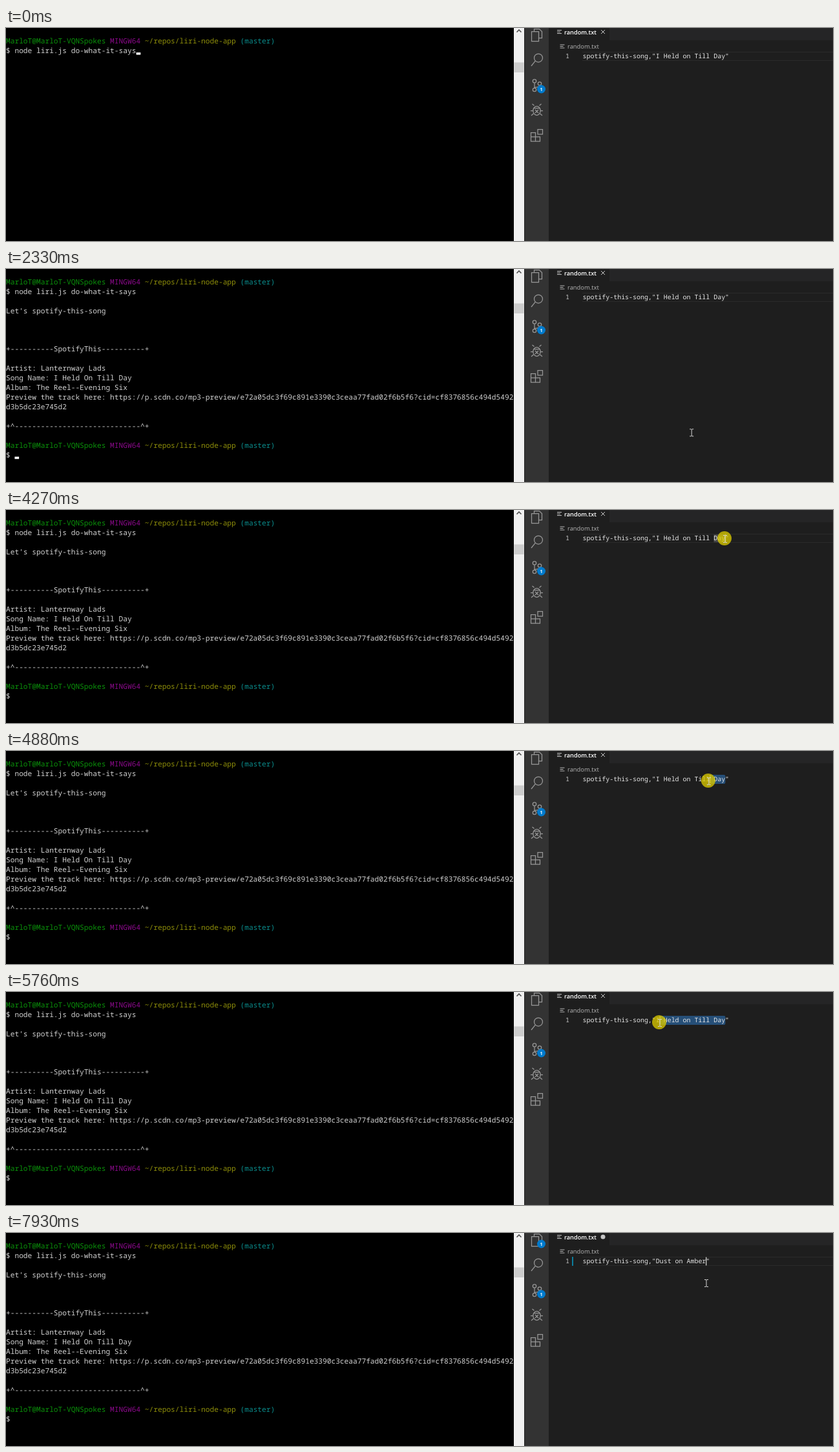
An HTML page that plays this animation: 1280x331 px, repeating every 8000 ms.

```html
<!DOCTYPE html>
<html lang="en">
<head>
<meta charset="utf-8">
<title>Terminal and editor</title>
<style>
  html, body { margin: 0; width: 100%; height: 100%; overflow: hidden; background: #000; }
  svg { display: block; width: 1280px; height: 331px; }
  text { text-rendering: geometricPrecision; white-space: pre; }
  #terminal { font: 500 11.2px "Noto Sans Mono", monospace; fill: #d0d0d0; }
  #editor { font: 500 9.95px "Noto Sans Mono", monospace; fill: #e6e6e6; }
  .ui { font: 9.4px "Open Sans", sans-serif; fill: #b4b4b4; }
  .ui.tab { font-size: 9.2px; font-weight: 600; fill: #fff; }
  .user { fill: #0a920a; }
  .system { fill: #8c0a8c; }
  .path { fill: #8e8e0a; }
  .branch { fill: #0a8c8c; }
  .icons { fill: none; stroke: #979797; stroke-width: 1.25; }
  .badge text { font: 700 7px "Open Sans", sans-serif; fill: #fff; text-anchor: middle; }
</style>
</head>
<body>
<svg viewBox="0 0 1280 331">
  <defs>
    <g id="disc"><circle r="6.5" fill="#007acc"/></g>
    <g id="lines" stroke-width="1.2"><path d="M0 .5h7M0 3h5M0 5.5h7"/></g>
  </defs>

  <rect width="786" height="331"/>
  <g id="terminal"></g>
  <rect id="block" width="6.7" height="3.6" fill="#fff"/>

  <rect x="786" width="16" height="331" fill="#f0f0f0"/>
  <rect x="786.5" y="53.5" width="15" height="15.5" fill="#cdcdcd"/>
  <path d="M790.500 6.500l3.500-3.500 3.500 3.500" fill="none" stroke="#505050" stroke-width="1.6"/>

  <rect x="802" width="38" height="331" fill="#333"/>
  <rect x="802" width="1" height="331" fill="#222"/>
  <rect x="840" width="440" height="331" fill="#1e1e1e"/>
  <rect x="934" width="346" height="19" fill="#252526"/>

  <g class="icons">
    <path d="M817.500 5.500V1.500h8l4 4v10h-5M817.500 5.500h-4V20.500h11V5.500z"/>
    <circle cx="824" cy="46.500" r="6.500"/>
    <path d="M819.300 51.200l-6.300 7.800"/>
    <circle cx="818" cy="82.500" r="2.700"/>
    <circle cx="818" cy="96" r="2.700"/>
    <circle cx="826" cy="86.500" r="2.700"/>
    <path d="M818 85.200v8M826 89.200q-1 3-8 3"/>
    <ellipse cx="821.500" cy="128.500" rx="5.700" ry="7"/>
    <path d="M816.500 124.500h10M817.500 120.500l-3-2.500M825.500 120.500l3-2.500M812 128.500h4M827 128.500h4M816.500 133l-3.500 3M826.500 133l3.500 3M819 127l5 5M824 127l-5 5"/>
    <path d="M812.500 162.500h7v13.500h-7zM812.500 169h14v7h-14zM823 157.500h7.500v7.500h-7.500z"/>
  </g>

  <g class="badge" transform="translate(828.5 95)">
    <use href="#disc"/>
    <text y="2.6" data-show="0-3190 3570-8000">1</text>
    <path data-show="3190-3570" d="M0-3V0H2.500" fill="none" stroke="#fff"/>
  </g>
  <g class="badge" transform="translate(828.5 17)" data-show="7700-8000">
    <use href="#disc"/>
    <text y="2.6">1</text>
  </g>

  <use href="#lines" x="853" y="3" stroke="#c5c5c5"/>
  <text class="ui tab" x="864" y="9.5">random.txt</text>
  <path data-show="0-7400" d="M921 3l6 6M927 3l-6 6" stroke="#c5c5c5"/>
  <circle data-show="7400-8000" cx="924" cy="6" r="3.500" fill="#c5c5c5"/>
  <use href="#lines" x="857.5" y="25.5" stroke="#b4b4b4"/>
  <text class="ui" x="869" y="32">random.txt</text>

  <g id="editor">
    <path data-show="0-4580 7400-8000" d="M892 37.500h388M892 50.500h388" stroke="#2b2b2b"/>
    <rect data-show="2870-4580" x="1095.500" y="38" width="18" height="12" fill="#474747"/>
    <rect id="selection" y="37" height="14" rx="2" fill="#264f78"/>
    <rect data-show="7700-8000" x="876" y="37" width="2" height="14" fill="#0c7d9d"/>
    <text x="866" y="47" fill="#c6c6c6">1</text>
    <text id="code" x="892.5" y="47"></text>
    <rect id="caret" y="37.500" width="1.300" height="13" fill="#d0d0cc"/>
  </g>

  <circle id="press" r="11" fill="#d8c800" opacity=".78"/>
  <path id="mouse" d="M-3-5.500h2.300l.7.700.7-.7H3M0-5V5M-3 5.500h2.300l.7-.7.7.700H3" fill="none" stroke="#d6d6d6"/>
</svg>

<script>
const LOOP = 8000, ROW = 14.92, CELL = 6.72;
const CODE_X = 892.5, CODE_CELL = 5.97, SELECT_END = 37;
const $ = id => document.getElementById(id);

const prompt = '<tspan class="user">MarloT@MarloT-VQNSpokes</tspan> ' +
  '<tspan class="system">MINGW64</tspan> ' +
  '<tspan class="path">~/repos/liri-node-app</tspan> ' +
  '<tspan class="branch">(master)</tspan>';
const rule = '-'.repeat(10);

// [row, time it is printed, content]
const output = [
  [0, 0, prompt],
  [1, 0, '$ node liri.js do-what-it-says'],
  [3, 690, "Let's spotify-this-song"],
  [7, 1160, `+${rule}SpotifyThis${rule}+`],
  [9, 1160, 'Artist: Lanternway Lads'],
  [10, 1160, 'Song Name: I Held On Till Day'],
  [11, 1160, 'Album: The Reel--Evening Six'],
  [12, 1160, 'Preview the track here: https://p.scdn.co/mp3-preview/e72a05dc3f69c891e3390c3ceaa77fad02f6b5f6?cid=cf8376856c494d5492'],
  [13, 1160, 'd3b5dc23e745d2'],
  [15, 1160, `+^${'-'.repeat(29)}^+`],
  [17, 1310, prompt],
  [18, 1310, '$']
];
$('terminal').innerHTML = output.map(([row, from, text]) =>
  `<text y="${24 + row * ROW}" data-show="${from}-${LOOP}">${text}</text>`).join('');

// [from, to, column, row]
const blocks = [
  [0, 230, 30, 1], [290, 690, 0, 2], [690, 1160, 0, 4],
  [1160, 1310, 0, 16], [1310, 1780, 2, 18], [2240, 2860, 2, 18]
];

// [time, x, y]
const mousePath = [
  [2180, 1040, 340], [2700, 1113, 45], [3000, 1113, 45], [3110, 1115, 44],
  [3570, 1115, 44], [3800, 1112, 46], [4100, 1113, 45], [4580, 1113, 45],
  [4880, 1088, 47], [5370, 1020, 47], [5760, 1012, 48], [6080, 1008, 49],
  [6690, 1010, 49], [6770, 1017, 56], [7080, 1085, 79], [7850, 1085, 79],
  [7930, 1084, 78]
];

const parseSpans = text => text.split(' ').map(span => span.split('-').map(Number));
const within = (spans, t) => spans.some(([from, to]) => t >= from && t < to);
const show = (el, on) => el.setAttribute('visibility', on ? 'inherit' : 'hidden');
const move = (el, x, y) => el.setAttribute('transform', `translate(${x} ${y})`);

const timed = [...document.querySelectorAll('[data-show]')]
  .map(el => ({ el, spans: parseSpans(el.dataset.show) }));
const pressSpans = parseSpans('2860-2950 4180-6340');
const caretSpans = parseSpans('2870-3400 3900-6600 7080-8000');

function mouseAt(t) {
  const next = mousePath.findIndex(key => key[0] > t);
  if (next < 1) return mousePath[next < 0 ? mousePath.length - 1 : 0].slice(1);
  const [t0, x0, y0] = mousePath[next - 1];
  const [t1, x1, y1] = mousePath[next];
  const k = (t - t0) / (t1 - t0);
  return [x0 + (x1 - x0) * k, y0 + (y1 - y0) * k];
}

function caretColumn(t) {
  if (t >= 7400) return 32;
  if (t < 4580) return SELECT_END;
  const [x] = mouseAt(Math.min(t, 6080));
  return Math.round((x - CODE_X) / CODE_CELL);
}

function render(t) {
  for (const { el, spans } of timed) show(el, within(spans, t));

  const block = blocks.find(([from, to]) => t >= from && t < to);
  show($('block'), block);
  if (block) move($('block'), block[2] * CELL, 38 + (block[3] - 1) * ROW);

  const song = t < 7400 ? 'I Held on Till Day' : 'Dust on Amber';
  $('code').textContent = `spotify-this-song,"${song}"`;

  const column = caretColumn(t);
  const caretX = CODE_X + column * CODE_CELL;
  $('caret').setAttribute('x', caretX - 0.5);
  show($('caret'), within(caretSpans, t));
  show($('selection'), t >= 4580 && t < 7400);
  $('selection').setAttribute('x', caretX);
  $('selection').setAttribute('width', Math.max(0, SELECT_END - column) * CODE_CELL);

  const [x, y] = mouseAt(t);
  show($('mouse'), t >= 2180);
  move($('mouse'), x, y);
  show($('press'), within(pressSpans, t));
  move($('press'), x - 1, y - 1);
}

function tick() {
  render(performance.now() % LOOP);
  requestAnimationFrame(tick);
}
tick();
</script>
</body>
</html>
```
